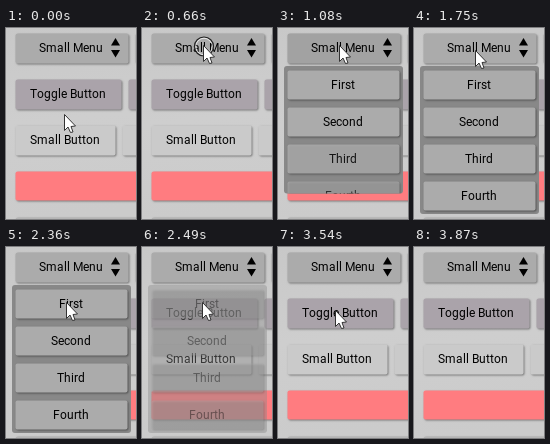
Recreate the animation shown at these times as an HTML page with a canvas. Size 130 by 191 pixels, loop 4.45 s.

```html
<!DOCTYPE html>
<html lang="en">
<head>
<meta charset="utf-8">
<title>Small menu</title>
<style>
html, body { margin: 0; width: 100%; height: 100%; overflow: hidden; background: #cbcbcb; }
canvas { display: block; width: 130px; height: 191px; }
</style>
</head>
<body>
<canvas></canvas>
<script>
const W = 130, H = 191, LOOP = 4450;
const canvas = document.querySelector('canvas');
const ctx = canvas.getContext('2d');
const dpr = window.devicePixelRatio || 1;
canvas.width = W * dpr;
canvas.height = H * dpr;
ctx.scale(dpr, dpr);

const clamp = v => Math.max(0, Math.min(1, v));
const mix = (a, b, p) => a + (b - a) * p;
const smooth = p => p * p * (3 - 2 * p);

// Progress in n equal jumps, the first at time a and the last at time b.
function steps(t, a, b, n) {
  if (t < a) return 0;
  return Math.min(n, 1 + Math.floor((t - a) / (b - a) * (n - 1) + 0.01)) / n;
}

function box(x, y, w, h, color, r = 2) {
  ctx.fillStyle = color;
  ctx.beginPath();
  ctx.roundRect(x, y, w, h, r);
  ctx.fill();
}

// Centred text whose letters advance by whole pixels.
function text(label, center, y) {
  const advance = c => Math.round(ctx.measureText(c).width);
  const letters = [...label];
  const width = letters.reduce((sum, c) => sum + advance(c), 0);
  let x = Math.round(center - width / 2);
  ctx.fillStyle = '#000';
  for (const c of letters) {
    ctx.fillText(c, x, y);
    x += advance(c);
  }
}

function button(x, y, w, h, color, label) {
  ctx.save();
  ctx.shadowColor = 'rgba(0,0,0,.4)';
  ctx.shadowBlur = 2 * dpr;
  ctx.shadowOffsetX = ctx.shadowOffsetY = dpr;
  box(x + 0.5, y + 0.5, w, h, color);
  ctx.restore();
  if (label) text(label, x + w / 2, Math.floor(y + h / 2 + 4));
}

function polygon(points) {
  ctx.beginPath();
  points.forEach(([x, y]) => ctx.lineTo(x, y));
  ctx.closePath();
}

function page(press) {
  const bg = ctx.createLinearGradient(0, 0, 20, H);
  bg.addColorStop(0, '#c8c8c8');
  bg.addColorStop(0.5, '#cecece');
  bg.addColorStop(1, '#cbcbcb');
  ctx.fillStyle = bg;
  ctx.fillRect(0, 0, W, H);

  const g = Math.round(mix(171, 145, press));
  button(9, 5, 113, 30, `rgb(${g},${g},${g})`, '');
  text('Small Menu', 65, 24);
  ctx.fillStyle = '#000';
  polygon([[105, 17.5], [109.5, 10], [114, 17.5]]);
  ctx.fill();
  polygon([[105, 22], [109.5, 29.5], [114, 22]]);
  ctx.fill();
  button(129, 5, 40, 30, '#ababab');

  button(9, 51, 106, 30, '#aaa3aa', 'Toggle Button');
  button(122, 51, 40, 30, '#aaa3aa');
  button(9, 97, 100, 30, '#cacaca', 'Small Button');
  button(116, 97, 40, 30, '#cacaca');
  button(9, 143, 140, 29, '#ff7c80');
  button(9, 189, 140, 30, '#b4b4b4');
}

function menu(open, alpha) {
  if (!open || !alpha) return;
  const height = 148 * open ** 0.52;
  ctx.save();
  ctx.globalAlpha = alpha;
  box(6, 38, 119, height, '#888', 3);
  ctx.beginPath();
  ctx.rect(6, 38, 119, height);
  ctx.clip();
  ['First', 'Second', 'Third', 'Fourth'].forEach((label, i) => {
    ctx.globalAlpha = alpha * clamp(open * 2 - i * 0.2 - 0.22);
    button(9, 42 + i * 37, 112, 29, '#ababab');
    text(label, 64.5, 61 + i * 37);
  });
  ctx.restore();
}

function pointerAt(t) {
  if (t < 1750) {
    const p = smooth(steps(t, 60, 480, 11));
    return [mix(58, 61, p), mix(86, 17, p)];
  }
  if (t < 3540) {
    const p = steps(t, 1750, 2090, 8);
    return [mix(61, 60, p), mix(17, 55, p)];
  }
  const p = steps(t, 3540, 3870, 9);
  return [60 - 35 * p + 58 * p * p, mix(55, 193, p ** 1.3)];
}

function pointer(x, y) {
  ctx.save();
  ctx.translate(Math.round(x) + 0.5, Math.round(y) + 0.5);
  polygon([[0, 0], [0, 16], [3.5, 12.5], [6, 18], [8.5, 17.5], [6.5, 12], [11, 11.5]]);
  ctx.fillStyle = '#fff';
  ctx.strokeStyle = '#333';
  ctx.lineWidth = 1;
  ctx.fill();
  ctx.stroke();
  ctx.restore();
}

function circle(x, y, r, color, width) {
  ctx.strokeStyle = color;
  ctx.lineWidth = width;
  ctx.beginPath();
  ctx.arc(x, y, r, 0, Math.PI * 2);
  ctx.stroke();
}

function ring(x, y) {
  circle(x + 1, y + 1.5, 8.5, 'rgba(255,255,255,.7)', 1.5);
  circle(x + 1, y + 1.5, 9.5, '#222', 1.2);
}

function draw(now) {
  const t = now % LOOP;
  const open = steps(t, 810, 1190, 8);
  const shut = steps(t, 2410, 2570, 5);
  const [x, y] = pointerAt(t);
  ctx.font = '12px Roboto, sans-serif';
  page(open ? clamp((1 - open) * 1.33) : 0);
  menu(open, 1 - shut);
  if ((t >= 660 && t < 810) || (t >= 2240 && t < 2360)) ring(x, y);
  pointer(x, y);
}

const start = performance.now();
function loop() {
  draw(performance.now() - start);
  requestAnimationFrame(loop);
}
loop();
</script>
</body>
</html>
```
